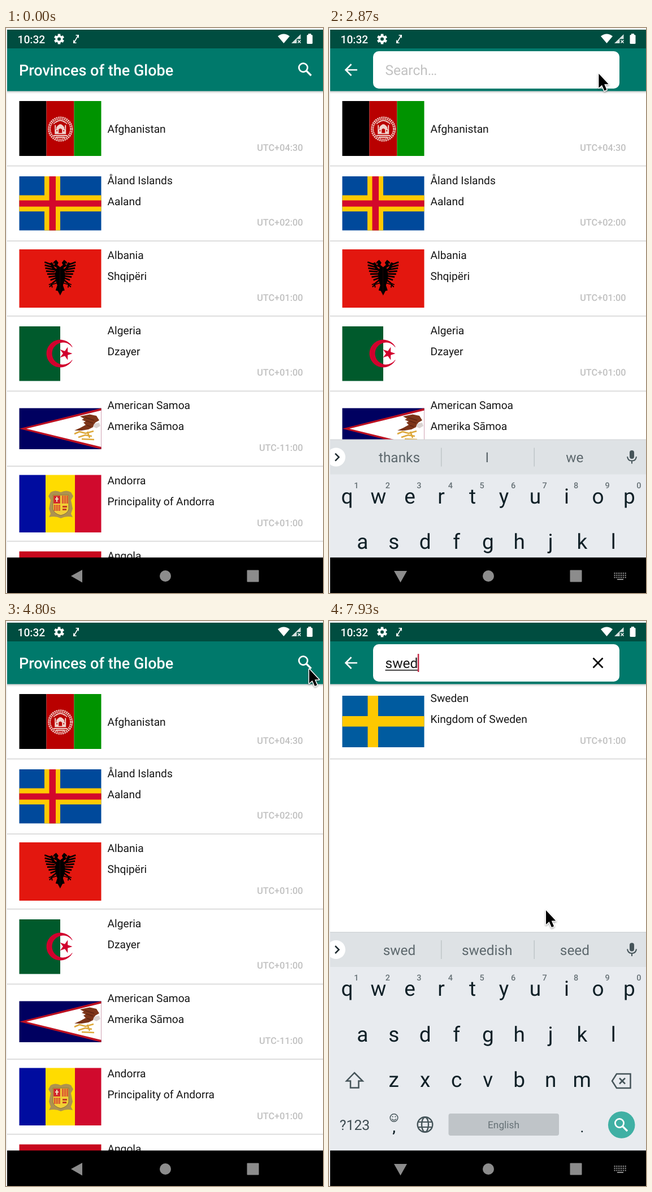
An HTML page with a canvas that plays this animation: 561x998 px, repeating every 8000 ms.

```html
<!DOCTYPE html>
<html lang="en">
<head>
<meta charset="utf-8">
<title>Country search</title>
<style>
html, body { margin: 0; width: 100%; height: 100%; overflow: hidden; background: #fff; }
canvas { display: block; width: 561px; height: 998px; }
</style>
</head>
<body>
<canvas id="stage" width="561" height="998"></canvas>
<script>
const ctx = document.getElementById('stage').getContext('2d');
const LOOP = 8000, ROW = 132.6;
const FONT = 'Roboto, sans-serif';
ctx.textRendering = 'geometricPrecision';

// ---------- helpers ----------
function rect(x, y, w, h, color) {
  ctx.fillStyle = color;
  ctx.fillRect(x, y, w, h);
}
function round(x, y, w, h, r, color) {
  ctx.fillStyle = color;
  ctx.beginPath();
  ctx.roundRect(x, y, w, h, r);
  ctx.fill();
}
function disc(x, y, r, color) {
  ctx.fillStyle = color;
  ctx.beginPath();
  ctx.arc(x, y, r, 0, 7);
  ctx.fill();
}
function ring(x, y, r, color, width) {
  ctx.strokeStyle = color;
  ctx.lineWidth = width;
  ctx.beginPath();
  ctx.arc(x, y, r, 0, 7);
  ctx.stroke();
}
function shape(d, color) {
  ctx.fillStyle = color;
  ctx.fill(new Path2D(d));
}
function line(d, color, width) {
  ctx.strokeStyle = color;
  ctx.lineWidth = width;
  ctx.stroke(new Path2D(d));
}
function text(s, x, y, size, color, align = 'left', weight = 400) {
  ctx.font = `${weight} ${size}px ${FONT}`;
  ctx.textAlign = align;
  ctx.fillStyle = color;
  ctx.fillText(s, x, y);
}
function at(x, y, draw) {
  ctx.save();
  ctx.translate(x, y);
  draw();
  ctx.restore();
}
function clip(x, y, w, h, draw) {
  ctx.save();
  ctx.beginPath();
  ctx.rect(x, y, w, h);
  ctx.clip();
  draw();
  ctx.restore();
}
const clamp = v => Math.max(0, Math.min(1, v));
const smooth = v => v * v * (3 - 2 * v);

// ---------- flags ----------
function bands(y, h, edges, colors) {
  colors.forEach((c, i) => rect(edges[i], y, edges[i + 1] - edges[i], h, c));
}
function cross(x, y, w, h, left, right, top, bottom, color) {
  rect(left, y, right - left, h, color);
  rect(x, top, w, bottom - top, color);
}

function afghanistan() {
  bands(129, 97, [23.5, 71.5, 120.5, 168.5], ['#000', '#b90000', '#009300']);
  at(96.2, 178.5, () => {
    const pale = '#f0d2cc', red = '#b90000';
    ctx.setLineDash([2.5, 1]);
    ring(0, 0, 19.5, pale, 5);
    ctx.setLineDash([]);
    ring(0, 0, 19.5, red, 0.8);
    line('M-12-9Q0-22 12-9M-8-12Q0-18 8-12', pale, 1.6);
    shape('M-10 9V0H-7V-3Q0-14 7-3V0H10V9Z', pale);
    shape('M-3 7V1Q0-3 3 1V7Z', red);
    line('M-9 0V-7M9 0V-7M-12 11.5H12M-8 14.5H8', pale, 2);
    line('M-7 3H-5M5 3H7', red, 2);
  });
}
function aland() {
  rect(23.5, 262, 145, 95.5, '#00499b');
  cross(23.5, 262, 145, 95.5, 68, 96, 295.5, 324, '#ffc900');
  cross(23.5, 262, 145, 95.5, 76.5, 88, 304.5, 315.5, '#d3082b');
}
function eagleHalf() {
  shape('M0-19 5-23 3-27 7-32 11-29 13-25 9-26 11-21 6-18 9-8 8 4 5 13 8 22 4 23 0 31Z', '#000');
  line('M5-12 12-17 16-27', '#000', 4);
  for (let i = 0; i < 8; i++) {
    const k = i / 7;
    line(`M${11 - 4 * k} ${-22 + 26 * k}L${27.5 - 14 * k * k} ${-28 + 37 * k}`, '#000', 2.8);
  }
  line('M6 9 16 12M13 9 20 12M15 12 14 17M15 12 19 16', '#000', 1.8);
}
function albania() {
  rect(23.5, 391, 145, 103, '#e3170f');
  at(95.8, 441.5, () => {
    eagleHalf();
    ctx.scale(-1, 1);
    eagleHalf();
  });
}
function algeria() {
  rect(23.5, 527, 72.5, 96.5, '#005a2c');
  ctx.fillStyle = '#d1002d';
  ctx.beginPath();
  ctx.arc(96, 575, 24.5, 0.5, -0.5);
  ctx.arc(101, 575, 19.5, -0.6, 0.6, true);
  ctx.fill();
  ctx.beginPath();
  for (let i = 0; i < 10; i++) {
    const a = i * Math.PI / 5, r = i % 2 ? 4.6 : 12;
    ctx.lineTo(105.5 + r * Math.cos(a), 575 + r * Math.sin(a));
  }
  ctx.fill();
}
function samoa() {
  rect(23.5, 671.5, 145, 72.5, '#000060');
  shape('M23.5 707.7 168.5 671.5V744Z', '#bd1021');
  shape('M36 707.7 168.5 675.5V740Z', '#fff');
  shape('M131 686 148 682.5 160 685 165 693 158 697 154 705 146 709 134 711 121 711 132 706 141 701 137 697 141 695 134 692 138 690Z', '#7d3519');
  shape('M156 699 165 697 167 703 160 707 154 704Z', '#d9d2d0');
  line('M140 688 156 693M142 694 154 698M143 702 150 704', '#4d1b0d', 1);
  line('M121 717 130 713 141 716 155 712M128 723 140 719 152 721M134 726 156 727M144 713 148 724', '#dda83a', 2.6);
}
function andorra() {
  bands(789.5, 101.5, [23.5, 70, 122, 168.5], ['#000c9f', '#ffdc00', '#d00a2d']);
  at(97, 841, () => {
    shape('M-18-21Q-10-26 0-21Q10-26 18-21L22-14 18-7 21 8 18 17 21 23Q10 20 0 25Q-10 20-21 23L-18 17-21 8-18-7-22-14Z', '#ad9250');
    shape('M-14-16H14V9Q12 17 0 20Q-12 17-14 9Z', '#f2cf35');
    rect(-13, -15, 12, 14, '#d22b2e');
    line('M-7-13V-4M-10-9H-4', '#eee2c0', 2);
    for (let i = 0; i < 4; i++) {
      rect(2 + i * 3, -15, 1.6, 14, '#d22b2e');
      rect(-12 + i * 3, 1, 1.6, 11, '#d22b2e');
    }
    rect(3, 3, 8, 3, '#c43d22');
    rect(3, 8, 7, 3, '#c43d22');
    line('M-14-16H14V9Q12 17 0 20Q-12 17-14 9Z', '#85703d', 1);
  });
}
function angola() { rect(23.5, 924.5, 145, 48, '#c8081d'); }
function sweden() {
  rect(23.5, 132, 145, 91, '#005b9f');
  cross(23.5, 132, 145, 91, 68.5, 87, 168, 186.5, '#fec800');
}

// ---------- list ----------
const COUNTRIES = [
  [afghanistan, 'Afghanistan', '', 'UTC+04:30'],
  [aland, 'Åland Islands', 'Aaland', 'UTC+02:00'],
  [albania, 'Albania', 'Shqipëri', 'UTC+01:00'],
  [algeria, 'Algeria', 'Dzayer', 'UTC+01:00'],
  [samoa, 'American Samoa', 'Amerika Sāmoa', 'UTC-11:00'],
  [andorra, 'Andorra', 'Principality of Andorra', 'UTC+01:00'],
  [angola, 'Angola', '', '']
];
const FOUND = [[sweden, 'Sweden', 'Kingdom of Sweden', 'UTC+01:00']];

function list(items) {
  items.forEach(([flag, name, native, zone], i) => {
    const y = i * ROW;
    flag();
    text(name, 179.5, (native || i ? 143 : 185) + y, 19.2, '#161616');
    text(native, 179.5, 180 + y, 19.2, '#161616');
    text(zone, 525.5, 216.5 + y, 16.3, '#c0c0c0', 'right', 500);
    rect(2, 242.7 + y, 559, 1.8, '#dadada');
  });
}

// ---------- bars ----------
function magnifier(x, y) {
  ring(x - 3, y - 3, 7.6, '#fff', 2.8);
  line(`M${x + 2.5} ${y + 2.5}L${x + 11} ${y + 11}`, '#fff', 3.2);
}

function statusBar() {
  rect(2, 3, 559, 33, '#004d40');
  text('10:32', 20.5, 26.5, 19.2, '#fff', 'left', 500);
  at(94, 19.5, () => {
    for (let i = 0; i < 6; i++) {
      ctx.rotate(Math.PI / 3);
      rect(-2.3, -9, 4.6, 5, '#fff');
    }
    ring(0, 0, 4.8, '#fff', 3.6);
  });
  line('M120.5 25.5 127.5 13.5M123.5 12.8H128.2V17.5M119.8 21.5V26.2H124.5', '#fff', 1.6);
  shape('M481 14.5Q491.5 6.5 502 14.5L491.5 27Z', '#fff');
  shape('M505 27 521.5 11V19.5H514.5V27Z', '#d5e2df');
  line('M516.5 21.5 521.5 26.5M521.5 21.5 516.5 26.5', '#fff', 1.5);
  round(532.5, 12, 10, 16, 1.5, '#fff');
  rect(535, 10, 5, 3, '#fff');
}

function toolbar(searching, query, caret) {
  rect(2, 36, 559, 75.5, '#00796b');
  const shade = ctx.createLinearGradient(0, 111.5, 0, 116);
  shade.addColorStop(0, 'rgba(0,0,0,.2)');
  shade.addColorStop(1, 'rgba(0,0,0,0)');
  rect(2, 111.5, 559, 4.5, shade);
  if (!searching) {
    text('Provinces of the Globe', 23, 84, 27, '#fff', 'left', 500);
    magnifier(529, 73);
    return;
  }
  line('M50 74H30M39.5 64 29.5 74 39.5 84', '#fff', 2.6);
  round(78, 41, 436, 66, 10, '#fff');
  if (!query) {
    text('Search…', 99.5, 83.3, 24.5, '#c2c2c2');
    return;
  }
  text(query, 99.5, 83.3, 24.5, '#181818');
  const w = ctx.measureText(query).width;
  rect(99.5, 86, w, 1.6, '#181818');
  if (caret) rect(99.5 + w - 0.5, 58, 2.5, 32, '#c62a47');
  line('M467.5 65.5 484.5 82.5M484.5 65.5 467.5 82.5', '#000', 2.7);
}

function navBar(keys) {
  const grey = '#8c8c8c';
  rect(2, 935.3, 559, 63, '#000');
  shape(keys ? 'M115 959H138L126.5 979.5Z' : 'M115 968 135 957V979.5Z', grey);
  disc(282, 968, 10, grey);
  round(426.5, 957.5, 21, 21, 1, grey);
  if (!keys) return;
  for (let r = 0; r < 3; r++)
    for (let c = 0; c < 6; c++) rect(504.5 + c * 3.8, 962 + r * 3.7, 2.2, 2.2, grey);
  rect(510, 973, 11, 2, grey);
}

// ---------- keyboard ----------
const INK = '#102027', SOFT = '#455459';

function keyRow(letters, x, y) {
  [...letters].forEach((ch, i) => text(ch, x + i * 55.5, y, 37, INK, 'center'));
}

function keyboard(words) {
  rect(2, 550, 559, 62, '#dee2e5');
  rect(2, 549, 559, 1.5, '#d4d8da');
  rect(2, 611, 559, 325, '#e8ebef');
  clip(2, 550, 40, 61, () => disc(12.5, 580.5, 16.5, '#fff'));
  line('M11 574 17.5 580.5 11 587', '#1d2a2f', 2.5);
  words.forEach((w, i) => text(w, 124.5 + i * 155.2, 589.5, 24.4, '#5d686d', 'center'));
  rect(198, 564, 1.5, 33, '#bfc5c8');
  rect(362.5, 564, 1.5, 33, '#bfc5c8');

  round(532, 568.5, 8, 15, 4, SOFT);
  line('M528 579.5Q529 587 536 587Q543 587 544 579.5M536 587V592', SOFT, 2);

  keyRow('qwertyuiop', 32, 662);
  [...'1234567890'].forEach((n, i) => text(n, 48.3 + i * 55.55, 635, 14.5, '#667176', 'center', 500));
  keyRow('asdfghjkl', 59.3, 742.5);
  keyRow('zxcvbnm', 114.7, 823);

  line('M45 798 59.5 812.5H52.5V824.5H38V812.5H31Z', SOFT, 2.5);
  line('M509 800H533.5V825H509L501 812.5Z', SOFT, 2.5);
  line('M514 807.5 524 817.5M524 807.5 514 817.5', SOFT, 2.5);

  text('?123', 45.5, 898.5, 24.8, '#3d4b51', 'center');
  ring(115, 877.5, 6.8, SOFT, 1.5);
  disc(112.5, 875.5, 1.1, SOFT);
  disc(117.5, 875.5, 1.1, SOFT);
  line('M111 879.5Q115 884 119 879.5', SOFT, 1.4);
  text(',', 115, 903, 26, INK, 'center', 500);

  ring(170, 889.5, 13.3, SOFT, 2.4);
  ctx.beginPath();
  ctx.ellipse(170, 889.5, 6, 13, 0, 0, 7);
  ctx.stroke();
  line('M158 885H182M158 894H182', SOFT, 2.2);

  round(211.5, 870, 195.5, 39, 4, '#bfc4c8');
  text('English', 309, 896, 17.3, '#667176', 'center');
  text('.', 448, 903, 26, INK, 'center');
  disc(517.7, 890, 23.8, '#40b0a4');
  magnifier(517, 890);
}

// ---------- motion ----------
const TRACK = [
  [1150, 575, 150], [1500, 535.5, 68.5], [2720, 535.5, 68.5], [3330, 157, 149],
  [3600, 42, 77], [4250, 42, 77], [4700, 536.5, 85], [5000, 536.5, 85], [5550, 384, 511]
];
// time, query, suggestions
const TYPING = [
  [0, '', ['thanks', 'I', 'we']],
  [6160, 's', ['s', 'so', 'see']],
  [6280, 'sw', ['sw', 'so', 'sweet']],
  [6400, 'swe', ['swe', 'see', 'sweet']],
  [6700, 'swed', ['swed', 'swedish', 'seed']]
];
const RESULT = 6780;

function pointer(t) {
  if (t < TRACK[0][0]) return;
  let i = TRACK.length - 1;
  while (TRACK[i][0] > t) i--;
  const a = TRACK[i], b = TRACK[i + 1] || a;
  const k = b === a ? 0 : smooth((t - a[0]) / (b[0] - a[0]));
  at(a[1] + (b[1] - a[1]) * k, a[2] + (b[2] - a[2]) * k, () => {
    const arrow = 'M0 0V25L5.6 20 10 30 14 28.2 9.8 18.5H17.3Z';
    ctx.lineJoin = 'round';
    ctx.shadowColor = 'rgba(0,0,0,.35)';
    ctx.shadowBlur = 3;
    ctx.shadowOffsetY = 1.5;
    line(arrow, '#fff', 3);
    ctx.shadowColor = 'transparent';
    shape(arrow, '#000');
  });
}

// 0 = hidden, 1 = fully up
function keyboardLift(t) {
  const up = start => 1 - (1 - clamp((t - start) / 220)) ** 2;
  return t < 4400 ? up(2800) * (1 - smooth(clamp((t - 3650) / 160))) : up(5000);
}

function draw(t) {
  const searching = (t >= 2690 && t < 4050) || t >= 4900;
  const [since, query, words] = TYPING.filter(s => s[0] <= t).pop();
  const lift = keyboardLift(t);

  rect(0, 0, 561, 998, '#fff');
  rect(0, 0, 561, 3, '#f3f3f3');
  rect(0, 3, 2, 995, '#f0f0f0');
  clip(2, 111, 559, 825, () => {
    list(t >= RESULT ? FOUND : query ? [] : COUNTRIES);
  });
  statusBar();
  toolbar(searching, query, (t - since) % 1000 < 500);
  if (lift > 0) clip(2, 540, 559, 396, () => {
    at(0, (1 - lift) * 387, () => keyboard(words));
  });
  navBar(lift > 0);
  pointer(t);
}

const start = performance.now();
function frame() {
  draw((performance.now() - start) % LOOP);
  requestAnimationFrame(frame);
}
frame();
</script>
</body>
</html>
```
